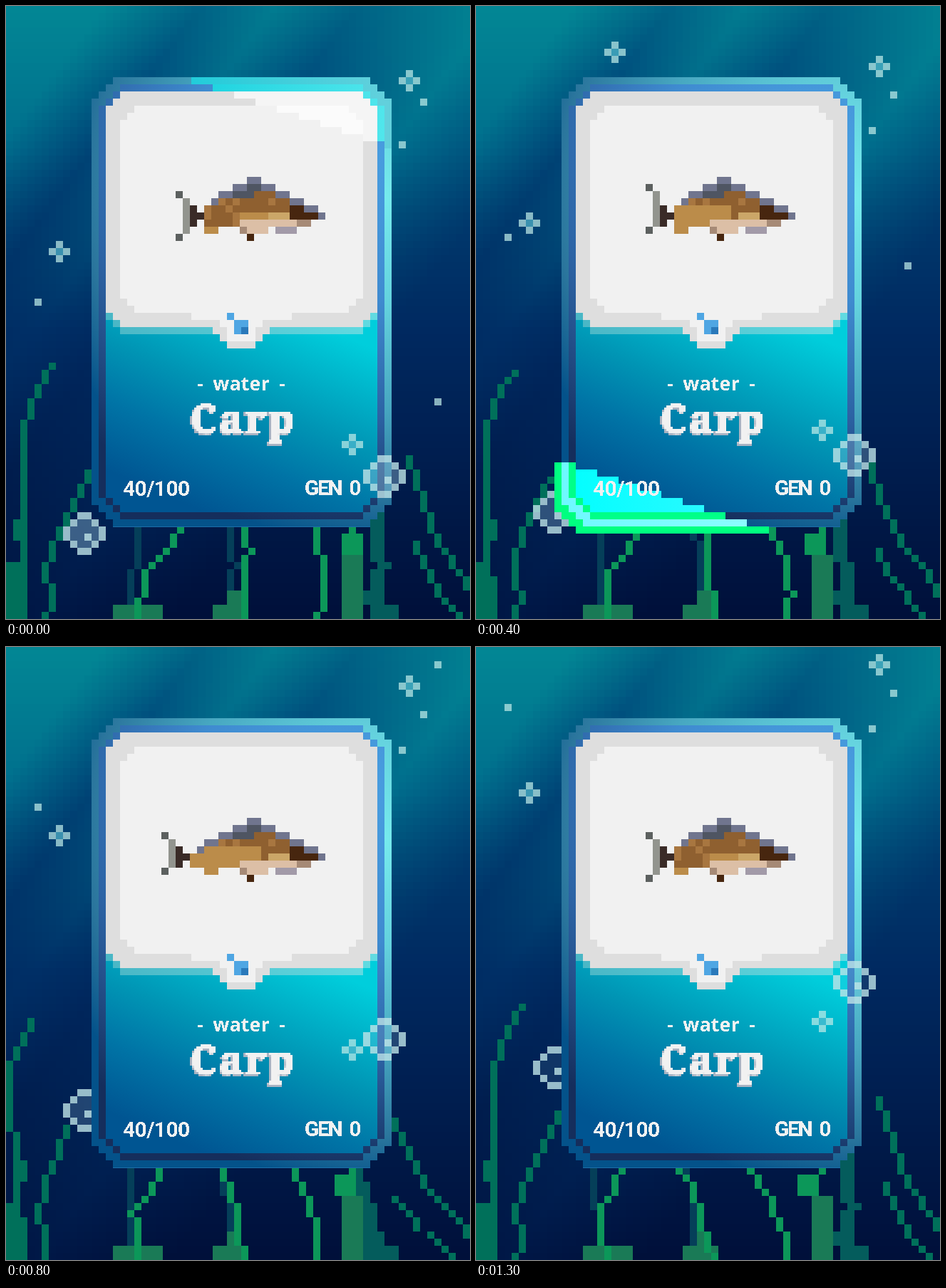
Write an HTML page with a canvas that moves like this. It is 651 px wide and 861 px high and loops after 1500 ms.

```html
<!DOCTYPE html>
<html lang="en">
<head>
<meta charset="utf-8">
<title>Carp card</title>
<style>
html, body { margin: 0; width: 100%; height: 100%; overflow: hidden; background: #00285e; }
canvas, svg { position: absolute; left: 0; top: 0; display: block; }
text { fill: #f1f1f1; }
.kind { font: 700 27px "Open Sans", "Noto Sans", sans-serif; word-spacing: 6px; }
.name { font: 700 56px "Noto Serif", serif; letter-spacing: 3px; stroke: #f1f1f1; stroke-width: 2; }
.shade { fill: #a9b3c2; stroke: #a9b3c2; }
.info { font: 700 30px Roboto, sans-serif; letter-spacing: -.6px; }
.gen { letter-spacing: -2.4px; word-spacing: 6px; }
</style>
</head>
<body>
<canvas id="stage" width="651" height="861"></canvas>
<svg width="651" height="861" viewBox="0 0 651 861">
  <filter id="blocky" filterUnits="userSpaceOnUse" x="240" y="540" width="186" height="93" color-interpolation-filters="sRGB">
    <feFlood x="241" y="541" width="1" height="1"/>
    <feOffset x="240" y="540" width="3" height="3"/>
    <feTile result="grid"/>
    <feComposite in="SourceGraphic" in2="grid" operator="in"/>
    <feMorphology operator="dilate" radius="1"/>
    <feComponentTransfer><feFuncA type="discrete" tableValues="0 1"/></feComponentTransfer>
  </filter>
  <filter id="crisp" color-interpolation-filters="sRGB">
    <feComponentTransfer><feFuncA type="discrete" tableValues="0 1"/></feComponentTransfer>
  </filter>
  <g filter="url(#crisp)">
    <text class="kind" x="330" y="540" text-anchor="middle">- water -</text>
    <text class="info" x="164" y="688">40/100</text>
    <text class="info gen" x="496" y="687" text-anchor="end">GEN 0</text>
  </g>
  <g filter="url(#blocky)">
    <text class="name shade" x="331" y="602" text-anchor="middle" aria-hidden="true">Carp</text>
    <text class="name" x="333" y="600" text-anchor="middle">Carp</text>
  </g>
</svg>
<script>
const ctx = document.getElementById('stage').getContext('2d');
const snap = v => Math.round(v * 1.0013);
const toGrid = v => Math.round(v / 10) * 10;

function rect(color, x, y, w, h) {
  ctx.fillStyle = color;
  const l = snap(x), t = snap(y);
  ctx.fillRect(l, t, snap(x + w) - l, snap(y + h) - t);
}

// Blocks on the 10px grid: "x y w h, x y w h"; w and h default to 1
function blocks(color, list, ox = 0, oy = 0) {
  for (const part of list.split(',')) {
    const [x, y, w = 1, h = 1] = part.trim().split(/\s+/).map(Number);
    rect(color, ox + x * 10, oy + y * 10, w * 10, h * 10);
  }
}

// Box with stepped corners
function plate(color, l, t, r, b, steps) {
  for (let i = 0; i <= steps; i++) {
    const inset = 10 * (steps - i);
    rect(color, l + inset, t + 10 * i, r - l - 2 * inset, b - t - 20 * i);
  }
}

function addStops(g, stops) {
  stops.forEach(([at, c]) => g.addColorStop(at, c));
  return g;
}
const radial = (x, y, r, ...stops) => addStops(ctx.createRadialGradient(x, y, 0, x, y, r), stops);
const linear = (x0, y0, x1, y1, ...stops) => addStops(ctx.createLinearGradient(x0, y0, x1, y1), stops);
const across = (a, b) => linear(120, 0, 530, 0, [0, a], [1, b]);

// Piecewise linear curve through ascending [key, ...values] points
function curve(points, key) {
  let i = 1;
  while (i < points.length - 1 && points[i][0] < key) i++;
  const a = points[i - 1], b = points[i];
  const k = Math.min(1, Math.max(0, (key - a[0]) / (b[0] - a[0])));
  return a.slice(1).map((v, n) => v + (b[n + 1] - v) * k);
}

const lit = [[0, 2, 134, 148], [200, 0, 110, 141], [450, 0, 50, 105], [860, 0, 23, 70]];
const dim = [[0, 0, 98, 133], [100, 0, 77, 125], [450, 0, 41, 96], [860, 0, 15, 57]];
const rays = [[130, 1], [265, 0], [370, .7], [485, 0], [680, 1], [870, 0]];

function sea() {
  for (let y = 0; y < 870; y += 10) {
    const a = curve(lit, y), b = curve(dim, y);
    for (let x = 0; x < 660; x += 10) {
      const [k] = curve(rays, x + .75 * y);
      rect(`rgb(${a.map((v, i) => Math.round(b[i] + (v - b[i]) * k))})`, x, y, 10, 10);
    }
  }
}

// A stem through [y, x] points; its tip leans left and sinks with the sway
function frond(color, sway, drop, points, width = 10) {
  const top = points[0][0] + drop * sway;
  for (let y = top; y < 860; y += 10) {
    const h = (860 - y) / (860 - top);
    const [x] = curve(points, y - drop * sway * h);
    rect(color, toGrid(x - 14 * sway * h), y, width, 10);
  }
}

const swing = (t, last) => t < 3 || t > 11 ? 0 : t < 6 || t > last ? 1 : 2;

function weeds(t) {
  const edge = swing(t, 8), mid = t < 4 ? 0 : t < 6 ? 1 : t < 10 ? 2 : 3;
  const leaf = '#00705a', dark = '#053f59', base = '#1a7a56', bright = '#0c9759';
  frond(leaf, edge, 10, [[500, 60], [550, 30], [590, 20], [720, 20], [860, 10]]);
  blocks(leaf, '0 78 2 2, 0 80 3 6, 1 72 2 3');
  frond(leaf, edge, 10, [[650, 110], [710, 80], [730, 70], [790, 50], [820, 60], [860, 50]]);
  frond(leaf, edge, 10, [[630, 560], [680, 575], [750, 600], [800, 640], [860, 660]]);
  frond(leaf, edge, 10, [[750, 570], [800, 590], [850, 625]]);
  frond('#045c5c', edge, 10, [[710, 510], [780, 515], [860, 505]], 20);
  blocks('#045c5c', '50 82 3 2, 52 84 3 2');
  frond(dark, mid / 2, 0, [[700, 180], [860, 170]]);
  frond(dark, mid / 2, 0, [[700, 305], [780, 315], [860, 305]]);
  blocks(base, '15 84 7 2, 29 84 5 2, 31 82 2 2, 47 77 3 9');
  frond(bright, mid, 0, [[730, 240], [760, 220], [785, 190], [860, 180]]);
  frond(bright, mid, 0, [[730, 325], [760, 335], [800, 330], [860, 330]]);
  frond(bright, mid, 0, [[730, 425], [770, 435], [820, 440], [860, 430]]);
  rect(bright, 470 - toGrid(mid * 5), 740, 30, 30);
  rect(bright, 480, 730, 10, 10);
}

const normal = {
  outer: radial(530, 270, 490, [0, '#76eaed'], [.3, '#64d2de'], [.6, '#47a7c1'], [.85, '#2b769d'], [1, '#04528a']),
  inner: radial(480, 200, 540, [0, '#4aa0e2'], [.4, '#3f8bd0'], [.7, '#2c63a4'], [1, '#152e5c']),
  water: linear(420, 440, 300, 720, [0, '#00cedc'], [.45, '#0094b4'], [.7, '#0074a6'], [1, '#005592']),
  line: across('#48b4c4', '#62dce2'), rim: '#dedede', paper: '#f1f1f1'
};
const shine = {
  outer: across('#00cad9', '#62d0dc'), inner: across('#00c8d8', '#50e6ec'), water: across('#00b4c8', '#45e6ec'),
  line: across('#48c4d0', '#7cecee'), rim: '#f5f5f5', paper: '#fbfbfb', halo: '#00cad9'
};
const flare = { ...shine, outer: across('#6ef8ff', '#9affff'), inner: '#00ff88', water: across('#00ffff', '#50f4ff'), halo: '#00ff80' };

function card(p) {
  if (p.halo) plate(p.halo, 110, 100, 530, 740, 3);
  plate(p.outer, 120, 100, 540, 730, 3);
  plate(p.inner, 130, 110, 530, 720, 3);
  plate(p.water, 140, 120, 520, 710, 2);
  plate(p.line, 140, 130, 520, 460, 2);
  plate(p.rim, 140, 120, 520, 450, 2);
  blocks(p.rim, '29 45 8 1, 30 46 6 1, 31 47 4 1');
  plate(p.paper, 160, 140, 500, 430, 2);
  blocks(p.paper, '26 43 14 1, 30 44 6 1, 31 45 4 2');
}

// A slanted band of light that runs down the card, gaining speed
function sweep(t) {
  if (t > 4) return;
  const top = 7 * t * t + 157 * t - 100;
  ctx.save();
  ctx.beginPath();
  for (let x = 110; x < 540; x += 10) {
    const y = snap(toGrid(top + (x - 120) * .33));
    ctx.rect(snap(x), y, snap(x + 10) - snap(x), 160);
  }
  ctx.clip();
  card(t < 4 ? shine : flare);
  ctx.restore();
}

const noise = (x, y) => Math.abs(Math.sin(x * 12.9 + y * 78.2) * 43758.5) % 1;

function scale(c, r, pose) {
  if (c > 15 && r < 6) return '#47260f';
  if (r > 5 && c > 8) return c > 16 ? '#a68a76' : '#dcbfa6';
  if (r > 4 && c > 12) return '#cba768';
  if (pose ? r > 3 && c < 12 : r > 4 && c > 8) return '#bb8c4a';
  return noise(c, r) > .6 ? '#a87640' : '#8f6030';
}

function fish(t) {
  const pose = swing(t, 9), tail = pose === 2 ? -2 : 0;
  const cell = (color, c, r, w = 1, h = 1) => rect(color, 237.5 + c * 10, 240 + r * 10, w * 10, h * 10);
  for (let c = 4 + tail; c <= 20; c++) {
    const ridge = Math.round(Math.abs(c - 10.5) / 2 - .2);
    const back = Math.max(ridge + 1, c < 11 ? 3 : 2);
    if (c > 4 + tail) for (let r = ridge; r < back; r++) cell(r > ridge && c < 13 ? '#4f5562' : '#70758e', c, r);
    for (let r = back; r < (c > 18 ? 6 : 7); r++) cell(scale(c, r, pose), c, r);
  }
  // Tail fork, mirrored about its middle row
  const middle = 5 - (pose === 1 ? 1 : pose / 4), half = pose === 2 ? 2.5 : 3;
  for (let d = -half; d <= half; d++) {
    const tip = Math.abs(d) > 2;
    cell(tip ? '#5c605f' : '#92948e', tail + (tip ? 0 : 1), middle + d);
  }
  cell('#3a2b27', tail + 2, 4, 1, 3);
  cell('#3a2b27', tail + 3, 5);
  // Fins and belly
  cell('#bb8c4a', 4, 7, 2);
  cell('#a68a76', 9, 7);
  cell('#dcbfa6', 10, 7, 3);
  cell('#a29aa8', 14, 7, 3);
  cell('#47260f', 10, 8);
}

const foam = 'rgba(190,234,232,.72)';
const dot = (x, y) => rect(foam, x, toGrid(y), 10, 10);
function sparkle(x, y) {
  y = toGrid(y);
  blocks(foam, '1 0, 0 1, 2 1, 1 2', x, y);
  blocks('rgba(90,190,210,.65)', '1 1', x, y);
}
function bubble(x, y, fill) {
  y = toGrid(y);
  blocks(`rgba(165,210,232,${fill})`, '2 1 2 1, 1 2 4 2, 2 4 2 1', x, y);
  blocks('rgba(190,228,232,.8)', '2 0 2 1, 1 1, 4 1, 0 2 1 2, 5 2 1 2, 1 4, 4 4, 2 5 2 1, 3 3', x, y);
}

// Shared rise of the slow bubbles: rest, climb, pause, climb
const climb = [[2, 0], [4, .18], [6, .42], [9, .67], [11, .67], [12, 1]];

function draw(t) {
  const [up] = curve(climb, t);
  const fill = .36 - t * .02;
  sea();
  weeds(t);
  bubble(80, 710 - 150 * up, fill);
  sparkle(180, 130 - 20 * t);
  sparkle(60, 330 - 10.4 * t);
  dot(40, 410 - 20 * t - .4 * t * t);
  dot(600, 550 - 30 * t - 4.5 * t * t);
  sparkle(550, 90 - 85 * up);
  dot(580, 130 - 70 * up);
  dot(550, 190 - 85 * up);
  card(normal);
  rect('#1d6ea8', 150, 730, 360, 1);
  sweep(t);
  blocks('#4fa6e3', '31 43, 32 44 2 2');
  blocks('#2a79ba', '33 45');
  fish(t);
  sparkle(470, 600 - 90 * up);
  bubble(500, 630 - 190 * up, fill);
}

const start = performance.now();
let shown = -1;
function frame() {
  const t = Math.min(13, Math.floor((performance.now() - start) % 1500 / 100));
  if (t !== shown) draw(shown = t);
  requestAnimationFrame(frame);
}
frame();
</script>
</body>
</html>
```
